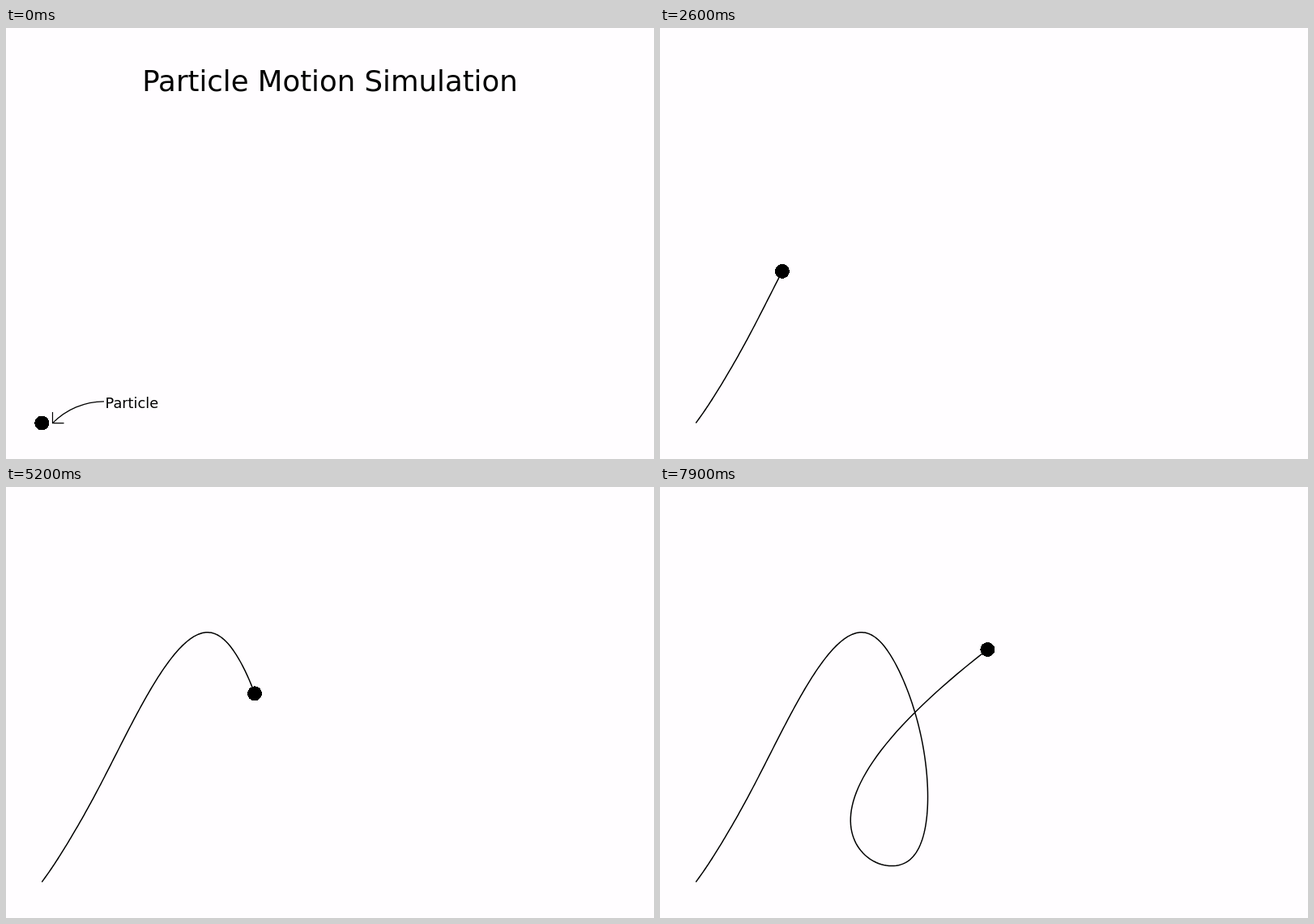
Write an HTML page that moves like this. It is 800 px wide and 533 px high and loops after 8000 ms.

```html
<!DOCTYPE html>
<html lang="en">
<head>
<meta charset="utf-8">
<title>Particle Motion Simulation</title>
<style>
  html, body { margin: 0; width: 100%; height: 100%; overflow: hidden; background: #fffdff; }
  svg { display: block; width: 100%; height: 100%; }
  text { font-family: "DejaVu Sans", sans-serif; }
  path { fill: none; stroke: #000; }
</style>
</head>
<body>
<svg viewBox="0 0 800 533">
  <g id="labels">
    <text x="400" y="78.4" font-size="35.53" text-anchor="middle">Particle Motion Simulation</text>
    <text x="122.5" y="469.7" font-size="17.77">Particle</text>
    <path stroke-width="1.2" d="M121 461.8A89 89 0 0 0 57.5 488.7M57.5 475V488.7H71.5"/>
  </g>
  <path id="trail" stroke-width="1.5"/>
  <circle id="ball" r="9" shape-rendering="crispEdges"/>
</svg>
<script>
  const LOOP = 8000, STEP = 100, SUB = 4;
  const FIRST = 4, SPACING = 7.5, FADE = 17;   // in steps

  // Smooth curve through evenly timed keys, with given tangents at both ends.
  function spline(keys, startTangent, endTangent) {
    const last = keys.length - 1;
    const m = keys.map(() => 0);
    m[0] = startTangent;
    m[last] = endTangent;
    for (let sweep = 0; sweep < 40; sweep++) {
      for (let i = 1; i < last; i++) {
        m[i] = (3 * (keys[i + 1] - keys[i - 1]) - m[i - 1] - m[i + 1]) / 4;
      }
    }
    return u => {
      const i = Math.min(last - 1, Math.floor(u)), s = u - i;
      const p = keys[i], d = keys[i + 1] - p, a = m[i], b = m[i + 1];
      return p + s * (a + s * (3 * d - 2 * a - b + s * (a + b - 2 * d)));
    };
  }

  const pathX = spline([44.3, 64.5, 107.5, 154, 200, 245.3, 289, 327.2, 308, 235.5, 404.3], 7, 405);
  const pathY = spline([488.5, 459, 385.3, 295, 217.2, 180, 215.5, 336.3, 461.3, 418, 201], -10, -315);

  function position(n) {
    const u = Math.max(0, (n - FIRST) / SPACING);
    return [pathX(u), pathY(u)];
  }

  const labels = document.getElementById("labels");
  const trail = document.getElementById("trail");
  const ball = document.getElementById("ball");
  const start = performance.now();
  let shown = -1;

  function draw(n) {
    const points = [];
    for (let k = FIRST * SUB; k <= n * SUB; k++) {
      points.push(position(k / SUB).map(v => v.toFixed(2)).join(" "));
    }
    trail.setAttribute("d", points.length > 1 ? "M" + points.join("L") : "");
    const [x, y] = position(n);
    ball.setAttribute("cx", x);
    ball.setAttribute("cy", y);
    labels.setAttribute("opacity", Math.min(1, Math.max(0, 1 - (n - FIRST) / FADE)));
  }

  function tick() {
    const n = Math.floor(Math.max(0, performance.now() - start) % LOOP / STEP);
    if (n !== shown) draw(shown = n);
    requestAnimationFrame(tick);
  }
  tick();
</script>
</body>
</html>
```
